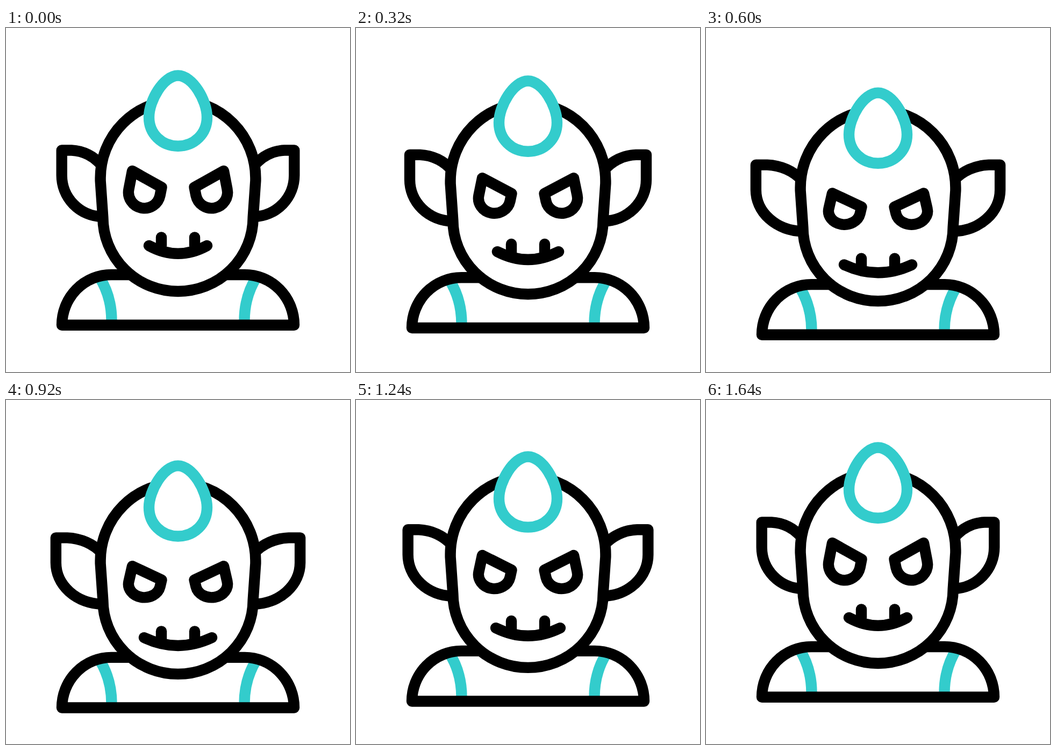
Animation of 640 by 640 pixels, one loop 2160 ms. Source, as an HTML page:

```html
<!DOCTYPE html>
<html lang="en">
<head>
<meta charset="utf-8">
<title>Goblin</title>
<style>
  html, body { margin: 0; width: 100%; height: 100%; overflow: hidden; background: #fff; }
  svg { display: block; width: 640px; height: 640px; }
  path { vector-effect: non-scaling-stroke; }
  .teal { stroke: #33cccc; }
  .round { stroke-linecap: round; }
</style>
</head>
<body>
<svg viewBox="0 0 640 640" fill="none" stroke="#000" stroke-width="20.4" stroke-linejoin="round">
  <defs>
    <path id="strap" class="teal" d="M173.5 463Q196.5 499 196.5 545"/>
    <path id="ear" d="M178 256A76 76 0 0 0 122 227.5H103.7V274A76.5 77 0 0 0 178 351"/>
    <path id="eye" d="M235 266L289.5 296.5L286.5 311.7A29 29 0 0 1 228.5 299.7Z"/>
    <path id="tooth" class="round" d="M289 389.5V405"/>
  </defs>
  <g id="body">
    <use href="#strap"/>
    <use href="#strap" transform="matrix(-1 0 0 1 640 0)"/>
    <path d="M232 459H196A92 93.7 0 0 0 104 552.7H536A92 93.7 0 0 0 444 459H408"/>
    <use href="#ear"/>
    <use href="#ear" transform="matrix(-1 0 0 1 640 0)"/>
    <path d="M175.6 279A144.4 144.4 0 0 1 464.4 279V284L459.7 352A139.7 138 0 0 1 180.3 352L175.6 284Z"/>
    <path id="egg" class="teal" fill="#fff" d="M320 88.5C347 88.5 374 135 374 166C374 197 350 219.7 320 219.7S266 197 266 166C266 135 293 88.5 320 88.5Z"/>
    <use href="#eye"/>
    <use href="#eye" transform="matrix(-1 0 0 1 640 0)"/>
    <use href="#tooth"/>
    <use href="#tooth" transform="matrix(-1 0 0 1 640 0)"/>
    <path id="mouth" class="round" d="M266 405Q320 434.5 374 405"/>
  </g>
</svg>
<script>
  const LOOP = 2160, STEP = 40;

  function ease(t, from, to) {
    const u = Math.min(1, Math.max(0, (t - from) / (to - from)));
    return u * u * (3 - 2 * u);
  }

  // Scales a part around (cx, cy), then moves it down by dy.
  function place(id, dy, sx = 1, sy = 1, cx = 0, cy = 0) {
    document.getElementById(id).setAttribute("transform",
      `matrix(${sx} 0 0 ${sy} ${cx - cx * sx} ${cy - cy * sy + dy})`);
  }

  function draw(now) {
    const t = Math.floor(now % LOOP / STEP) * STEP;
    const sink = ease(t, 115, 735) - ease(t, 840, 1530);
    const scowl = ease(t, 145, 592) - ease(t, 975, 1640);
    place("body", 20.6 * sink);
    place("egg", 14 * scowl);
    place("ear", 9 * scowl, 1 + 0.15 * scowl, 1, 176, 0);
    place("eye", 23.3 * scowl, 1, 1 - 0.16 * scowl, 0, 266);
    place("tooth", 21 * scowl);
    place("mouth", 17.3 * scowl, 1 + 0.167 * scowl, 1, 320, 0);
    requestAnimationFrame(draw);
  }
  requestAnimationFrame(draw);
</script>
</body>
</html>
```
